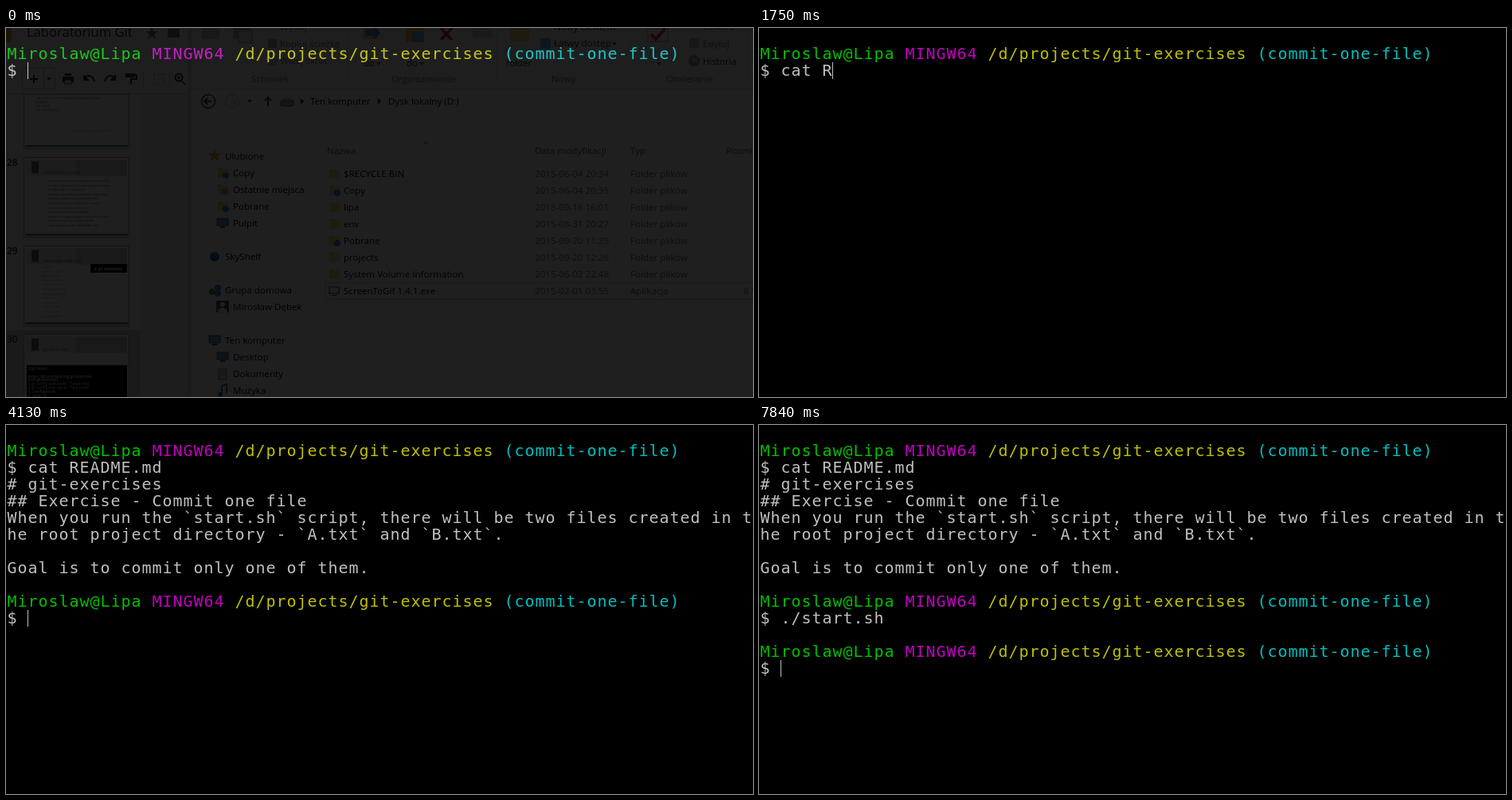
An HTML page that plays this animation: 938 px wide and 463 px high, repeating every 8 s.

```html
<!DOCTYPE html>
<html lang="pl">
<head>
<meta charset="utf-8">
<title>Terminal</title>
<style>
html, body { margin: 0; width: 100%; height: 100%; overflow: hidden; background: #000; }
svg { display: block; width: 938px; height: 463px; }
text { white-space: pre; }
#term { font: 20px "DejaVu Sans Mono", monospace; letter-spacing: .959px; }
#desk { font: 11.6px "Open Sans", sans-serif; opacity: .12; }
</style>
</head>
<body>
<svg id="stage" viewBox="0 0 938 463">
  <rect width="938" height="463"/>
  <g id="term"></g>
  <rect id="caret" width="1" height="21" fill="#bfbfbf"/>
  <g id="desk"></g>
  <path id="mouse" d="M-4-8h3l1 1 1-1h3M0-7V7M-4 8h3l1-1 1 1h3" fill="none" stroke="#000" stroke-width="1.4"/>
</svg>
<script>
const $ = id => document.getElementById(id);
const LOOP = 8000, TICK = 70, CELL = 13, ROW = 21;

// ---------- terminal ----------
const GREY = '#bfbfbf';
const prompt = [[0, 'Miroslaw@Lipa', '#00bf00'], [14, 'MINGW64', '#bf00bf'],
  [22, '/d/projects/git-exercises', '#bfbf00'], [48, '(commit-one-file)', '#00bfbf']];
const plain = s => [[0, s, GREY]];
const rows = [prompt, plain('$ '), plain('# git-exercises'), plain('## Exercise - Commit one file'),
  plain('When you run the `start.sh` script, there will be two files created in t'),
  plain('he root project directory - `A.txt` and `B.txt`.'), [],
  plain('Goal is to commit only one of them.'), [], prompt, plain('$ '), [], prompt, plain('$ ')];

// time, rows shown, caret row, caret column
const steps = [[0, 2, 1, 2], [3080, 8, 8, 0], [3220, 11, 10, 2], [7560, 11, 11, 0],
  [7700, 12, 12, 0], [7770, 13, 13, 0], [7840, 14, 13, 2]];

// the last key of the first command is a tab that completes the name
const cmds = {
  1: { text: 'cat README.md ', keys: [1050, 1190, 1260, 1400, 1750, 1890, 2030, 2310, 2520] },
  10: { text: './start.sh', keys: [6020, 6160, 6300, 6370, 6510, 6580, 6720, 6790, 6930, 7140] }
};
const wakes = [0, 630, ...cmds[1].keys, 3080, 3150, 5950, ...cmds[10].keys, 7560, 7700];

const typed = (cmd, t) => {
  const n = cmd.keys.filter(k => k <= t).length;
  return n === cmd.keys.length ? cmd.text : cmd.text.slice(0, n);
};

const lines = rows.map((parts, r) => {
  const g = document.createElementNS('http://www.w3.org/2000/svg', 'g');
  g.innerHTML = parts.map(([c, s, fill]) =>
    `<text x="${1.5 + c * CELL}" y="${39 + r * ROW}" fill="${fill}">${s}</text>`).join('');
  $('term').append(g);
  return g;
});

// ---------- desktop seen through the window ----------
const box = (x, y, w, h, fill, more = '') => `<rect x="${x}" y="${y}" width="${w}" height="${h}" fill="${fill}" ${more}/>`;
const label = (x, y, s, fill = '#000', size = 11.6, more = '') => `<text x="${x}" y="${y}" fill="${fill}" font-size="${size}" ${more}>${s}</text>`;
const line = (d, color = '#444', w = 1.5) => `<path d="${d}" fill="none" stroke="${color}" stroke-width="${w}"/>`;
const area = (d, fill) => `<path d="${d}" fill="${fill}"/>`;
const disc = (x, y, r, fill, more = '') => `<circle cx="${x}" cy="${y}" r="${r}" fill="${fill}" ${more}/>`;
const down = (x, y) => area(`M${x - 3} ${y - 2}h6l-3 4z`, '#555');
const folder = (x, y) => box(x, y - 6, 6, 3, '#e3bd5c') + box(x, y - 5, 13, 11, '#f3d98b');
const screen = (x, y) => box(x, y - 5, 14, 9, '#5aa0d8', 'stroke="#555"') + box(x + 4, y + 5, 6, 2, '#555');

function thumb(y, num, body) {
  return label(1, y + 10, num, '#333', 12, 'font-weight="600"') +
    box(22.5, y, 132, 100, '#fff', 'stroke="#999"') +
    box(25, y + 3, 127, 20, '#e4e4e4') + box(88, y + 3, 64, 20, '#c9c9c9') +
    box(32, y + 5, 9, 15, '#666') + box(24, y + 96, 129, 2, '#1c7a5a') + body;
}

function tiny(x, y, list, gap, fill = '#555') {
  return list.map((s, i) => label(x, y + i * gap, s, fill, 4.2)).join('');
}

function slides() {
  const notes = ['repozytorium przechowuje całą historię', 'zmiany zapisujemy w kolejnych krokach',
    'każdy krok ma swój opis', 'gałęzie pozwalają pracować równolegle', 'łączenie gałęzi tworzy nowy krok',
    'konflikty trzeba rozwiązać ręcznie', 'wynik wysyłamy na serwer', 'historię można przeglądać',
    'zadania są sprawdzane automatycznie', 'polecenie verify wysyła wynik', 'opis znajduje się w README.md'];
  const tasks = ['master', 'commit-one-file', 'ignore-them', 'chase-branch', 'merge-conflict', 'save-your-work',
    'change-branch', 'fix-typo', 'forge-date', 'fix-old-typo', 'commit-lost', 'split-commit'];
  const code = ['$ git clone [', '', 'https://git.example.org/git-exercises', '$ cd git-exercises',
    '$ git config user.name "Twoje imie"', '$ git config user.email "Twoj email"', '$ ./configure.sh', '$ ./start.sh'];
  let s = box(0, 0, 230, 463, '#f1f1f1') + box(170, 83, 58, 380, '#e9e9e9') + box(0, 0, 7, 18, '#e8b53a');
  s += label(26, 11, 'Laboratorium Git', '#222', 16.6);
  s += area('M183-2l2 6h6l-5 4 2 6-5-4-5 4 2-6-5-4h6z', '#777') + box(203, 1, 15, 11, '#777');
  // toolbar
  s += box(20.5, 50.5, 41, 26, '#f6f6f6', 'stroke="#bbb" rx="2"') + line('M47.5 51v25', '#bbb', 1) + line('M30 64h10M35 59v10', '#222', 2) + down(54, 64);
  s += box(71, 61, 14, 7, '#333') + box(74, 57, 8, 3, '#333') + box(74, 65, 8, 5, '#eee', 'stroke="#333"');
  s += line('M99 62c5-4 10-2 12 5', '#333', 2) + area('M97 58v8h8z', '#333');
  s += line('M136 62c-5-4-10-2-12 5', '#333', 2) + area('M138 58v8h-8z', '#333');
  s += box(150, 57, 12, 5, '#333') + line('M162 59h2v5h-7v7', '#333', 2);
  s += line('M172.5 52v24', '#ccc', 1) + box(186, 58, 12, 12, 'none', 'stroke="#999" stroke-dasharray="2 2"') + line('M205.5 52v24', '#ccc', 1);
  s += disc(217, 62, 4.5, 'none', 'stroke="#333" stroke-width="2"') + line('M220 66l5 5M215 62h4M217 60v4', '#333', 1.6);
  s += line('M0 82.5h228', '#ccc', 1);
  // slide list
  s += box(22.5, 83, 132, 68, '#fff', 'stroke="#999"') + box(24, 147, 129, 2, '#1c7a5a');
  s += tiny(36, 89, ['• git rebase - przenoszenie kolejnych zmian', 'na gałąź', '• git stash', '• git cherry-pick'], 5);
  s += tiny(78, 130, ['dokumentacja w podręczniku'], 5, '#aaa');
  s += thumb(162.5, 28, label(47, 183, 'Zadania laboratoryjne', '#666', 4.6) + tiny(53, 193, notes, 5.6));
  s += thumb(273.5, 29, label(47, 294, 'Lista zadań - kolejność', '#666', 4.6) + tiny(45, 301, tasks, 5.6, '#999') +
    box(106, 296, 46, 11, '#000') + label(111, 304, '$ git exercises', '#fff', 5, 'font-weight="700"'));
  s += box(0, 379, 169, 84, '#d5d5d5');
  s += thumb(384.5, 30, label(47, 405, 'git clone - start', '#666', 4.6) + box(26, 423, 126, 40, '#000') +
    code.map((c, i) => label(28, 429 + i * 4.8, c, /user/.test(c) ? '#eec96a' : '#fff', 4.6, 'font-weight="600"')).join(''));
  return s;
}

function ribbon() {
  const ink = '#222', soft = '#777';
  let s = box(228, 0, 5, 463, '#d8d8d8') + box(233, 0, 705, 463, '#fff') + box(233, 0, 705, 76, '#f5f6f7');
  s += line('M233 76.5h705', '#d5d5d5', 1) + line('M428.5 0v72M616.5 0v72M783.5 0v72M932.5 0v72', '#ddd', 1);
  s += box(246, 0, 22, 14, '#b9c7d4') + box(285, 0, 22, 14, '#d5b77b') + box(292, 3, 17, 15, '#eee', 'stroke="#999"');
  s += label(344, 3, 'Wytnij', soft) + label(344, 24, 'Kopiuj ścieżkę', soft) + label(344, 45, 'Wklej skrót', soft);
  s += box(329, 14, 11, 11, '#7eb0dc') + box(329, 36, 11, 11, '#b9c7d4');
  s += box(448, 0, 20, 14, '#e8c65d') + area('M452 2h10v-4l8 8-8 8v-4h-10z', '#3b8ed0') + box(502, 0, 22, 18, '#e8c65d') + box(510, 5, 15, 13, '#7eb0dc');
  s += line('M546 0l14 15M560 0l-14 15', '#d03f34', 4) + box(586, 0, 25, 12, '#c9d5e2');
  s += label(449, 48, 'do', ink) + down(468, 45) + label(503, 48, 'do', ink) + down(522, 45);
  s += box(633, 0, 24, 17, '#f0d27c') + label(628, 48, 'folder', ink);
  s += label(688, 3, 'Nowy element', ink) + label(688, 23, 'Łatwy dostęp', ink) + down(764, 20) + box(671, 13, 13, 13, '#7eb0dc');
  s += box(806, 0, 25, 17, '#fff', 'stroke="#999"') + line('M810 8l6 6 12-14', '#d03f34', 4) + down(820, 45);
  s += label(875, 3, 'Otwórz', soft) + label(875, 24, 'Edytuj', soft) + label(875, 46, 'Historia', ink);
  s += box(858, 13, 12, 12, '#bbb') + disc(864, 41, 7, '#79b37b') + line('M864 37v4h4', '#fff');
  [[308, 'Schowek'], [484, 'Organizowanie'], [685, 'Nowy'], [829, 'Otwieranie']].forEach(([x, t]) => s += label(x, 68, t, soft));
  return s;
}

function explorer() {
  const grey = '#6d6d6d';
  let s = ribbon();
  s += disc(254, 92, 8.5, 'none', 'stroke="#444" stroke-width="1.6"') + line('M258 92h-8M253 88l-4 4 4 4', '#444', 1.8);
  s += disc(284, 92, 8.5, 'none', 'stroke="#ccc" stroke-width="1.4"') + line('M280 92h8M285 88l4 4-4 4', '#ccc');
  s += down(306, 92) + line('M329 98v-11M325 91l4-4 4 4', '#444', 2);
  s += box(345, 91, 16, 7, '#aaa', 'stroke="#555" rx="2"') + box(348, 88, 10, 3, '#ccc');
  s += area('M370 88l4 4-4 4zM467 88l4 4-4 4z', '#333') + label(382, 96, 'Ten komputer') + label(480, 96, 'Dysk lokalny (D:)');
  s += line('M524 146l3-3 3 3', '#777', 1.2);
  [[403, 'Nazwa'], [664, 'Data modyfikacji'], [784, 'Typ'], [904, 'Rozmiar']].forEach(([x, t]) => s += label(x, 158, t, '#555'));

  const files = [['$RECYCLE.BIN', '06-04 20:34'], ['Copy', '06-04 20:35'], ['lipa', '09-18 16:01'], ['env', '08-31 20:27'],
    ['Pobrane', '09-20 11:39'], ['projects', '09-20 12:26'], ['System Volume Information', '06-02 22:48'], ['ScreenToGif 1.4.1.exe', '02-01 03:55']];
  s += box(400.5, 319.5, 545, 21, 'none', 'stroke="#ccc"');
  files.forEach(([name, date], i) => {
    const y = 183 + i * 21, app = i === 7;
    s += app ? box(406, y - 5, 12, 8, '#fff', 'stroke="#333"') + box(409, y + 5, 6, 1, '#333') : folder(406, y);
    if (i === 1 || i === 4) s += disc(416, y + 3, 4, '#3b8ed0');
    s += label(424, y + 4, name) + label(664, y + 4, '2015-' + date, grey) + label(784, y + 4, app ? 'Aplikacja' : 'Folder plików', grey);
  });
  s += label(926, 334, '8 5', grey);

  const places = [[275, 160, 'Ulubione'], [285, 181, 'Copy'], [285, 202, 'Ostatnie miejsca'], [285, 223, 'Pobrane'], [285, 244, 'Pulpit'],
    [275, 286, 'SkyShelf'], [275, 328, 'Grupa domowa'], [285, 349, 'Mirosław Dębek'],
    [275, 391, 'Ten komputer'], [285, 412, 'Desktop'], [285, 433, 'Dokumenty'], [285, 454, 'Muzyka']];
  places.forEach(([x, y, t]) => s += label(x, y + 5, t));
  s += area('M262 152l2 5h6l-4 4 2 6-6-3-6 3 2-6-4-4h6z', '#e9a93a');
  s += folder(266, 182) + disc(276, 185, 4, '#3b8ed0') + folder(266, 203) + box(271, 202, 8, 7, '#9ab') + folder(266, 224) + disc(276, 227, 4, '#3b8ed0');
  s += screen(265, 244) + disc(262, 287, 6, '#1e62b8');
  s += disc(259, 331, 4, '#3f9b55') + disc(266, 326, 4, '#3b8ed0') + disc(266, 333, 4, '#3b8ed0');
  s += box(264, 342, 16, 15, '#555') + disc(272, 347, 3, '#eee') + area('M266 357c0-8 12-8 12 0z', '#eee');
  s += screen(255, 391) + screen(265, 412) + box(267, 428, 10, 13, '#d9e4ee', 'stroke="#777"') + line('M269 432h6M269 435h6', '#3b8ed0', 1);
  s += line('M271 460v-11l6-2v11', '#2672b8', 2) + disc(269, 460, 3, '#2672b8');
  return s;
}

$('desk').innerHTML = slides() + explorer();

// ---------- playback ----------
const show = (el, on) => el.setAttribute('visibility', on ? 'visible' : 'hidden');

function draw(t) {
  const [, shown, row, col] = steps.filter(s => s[0] <= t).pop();
  lines.forEach((g, i) => show(g, i < shown));
  for (const r in cmds) lines[r].firstChild.textContent = '$ ' + typed(cmds[r], t);

  const at = col + (cmds[row] ? typed(cmds[row], t).length : 0);
  const wake = Math.max(...wakes.filter(w => w <= t));
  $('caret').setAttribute('x', 1 + at * CELL);
  $('caret').setAttribute('y', 22 + row * ROW);
  show($('caret'), t < 630 || Math.floor((t - wake) / 490) % 2 === 0);

  show($('desk'), t < 630);
  show($('mouse'), t >= 280 && t < 630);
  const left = (1 - (Math.floor(t / TICK) * TICK - 280) / 280) ** 2;
  $('mouse').setAttribute('transform', `translate(${664 + 250 * left} ${322 + 130 * left})`);
}

const start = performance.now();
function frame() {
  draw((performance.now() - start) % LOOP);
  requestAnimationFrame(frame);
}
frame();
</script>
</body>
</html>
```
